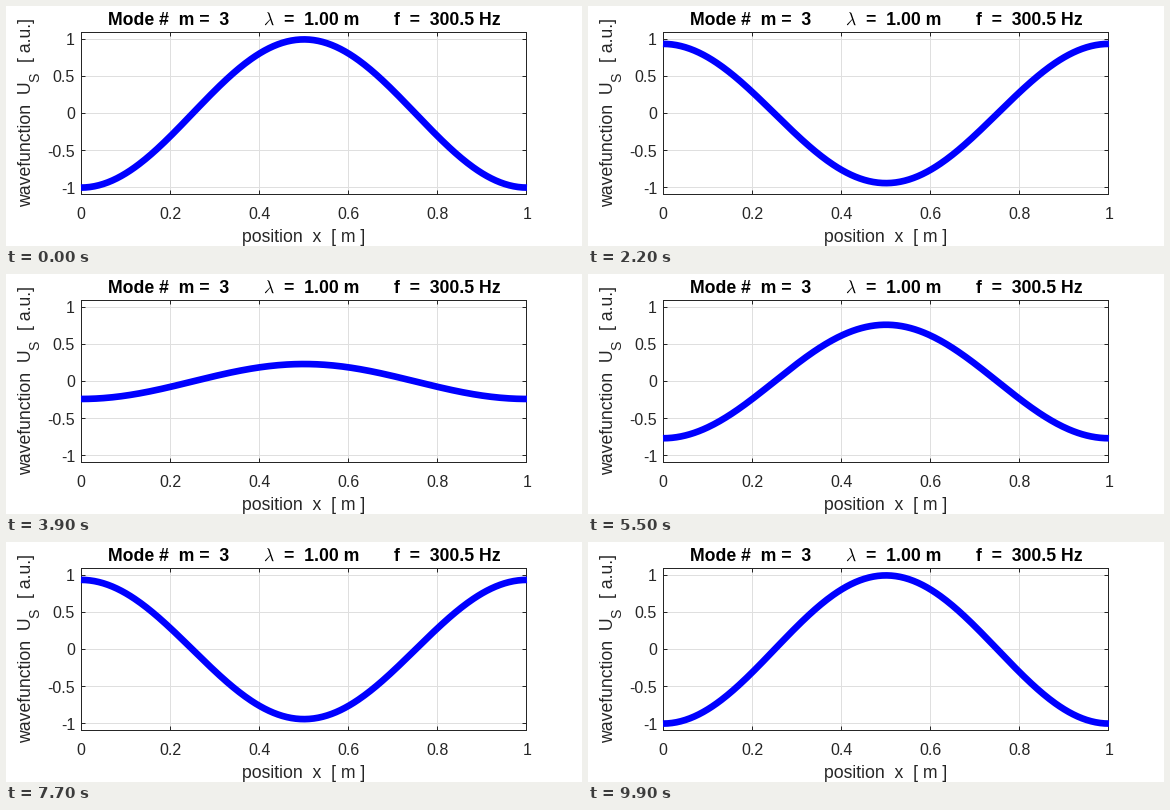
Write a matplotlib script that moves like this. It is 576x240 px and loops after 10000 ms.

```python
import math

import numpy as np
import matplotlib.pyplot as plt
from matplotlib.animation import FuncAnimation

plt.rcParams["font.family"] = "Liberation Sans"

W, H = 576, 240
LEFT, RIGHT, TOP, BOTTOM = 75, 521, 26, 189
Y_LIMIT = 1.1
FRAMES, INTERVAL = 100, 100
CYCLES = 2
INK, GRID = "#262626", "#dfdfdf"
TICK_SIZE, LABEL_SIZE = 16, 17.6
TICK_LEN = 4.5

# At 72 dpi one point is one pixel, so all sizes below are pixels.
fig = plt.figure(figsize=(W / 72, H / 72), dpi=72, facecolor="white")
ax = fig.add_axes([0, 0, 1, 1])
ax.set_xlim(0, W)
ax.set_ylim(H, 0)
ax.axis("off")


def px(x):
    return LEFT + x * (RIGHT - LEFT)


def py(y):
    return (TOP + BOTTOM) / 2 - y * (BOTTOM - TOP) / (2 * Y_LIMIT)


def center(v, end):
    """Centre of the pixel holding v, kept inside the box."""
    return min(math.floor(v), end - 1) + 0.5


def rule(x0, y0, x1, y1, color, z):
    ax.plot([x0, x1], [y0, y1], color=color, lw=1, zorder=z,
            solid_capstyle="butt", snap=False)


def label(x, y, s, size=LABEL_SIZE, color=INK, **kw):
    ax.text(x, y, s, fontsize=size, color=color, va="baseline", **kw)


def side_label(y, s, x=25, size=LABEL_SIZE):
    label(x, y, s, size, rotation=90, rotation_mode="anchor")


# Grid, ticks and tick labels
for v in np.arange(6) / 5:
    x = center(px(v), RIGHT)
    if 0 < v < 1:
        rule(x, TOP, x, BOTTOM, GRID, 1)
    rule(x, BOTTOM, x, BOTTOM - TICK_LEN, INK, 2)
    rule(x, TOP, x, TOP + TICK_LEN, INK, 2)
    label(px(v), 213, f"{v:g}", TICK_SIZE, ha="center")

for v in np.arange(-2, 3) / 2:
    y = center(py(v), BOTTOM)
    rule(LEFT, y, RIGHT, y, GRID, 1)
    rule(LEFT, y, LEFT + TICK_LEN, y, INK, 2)
    rule(RIGHT, y, RIGHT - TICK_LEN, y, INK, 2)
    label(69, py(v) + 5.98, f"{v:g}", TICK_SIZE, ha="right")

# Box
for y in (TOP + 0.5, BOTTOM - 0.5):
    rule(LEFT, y, RIGHT, y, INK, 3)
for x in (LEFT + 0.5, RIGHT - 0.5):
    rule(x, TOP, x, BOTTOM, INK, 3)

# Title and axis labels
bold = dict(color="black", weight="bold")
label(101.5, 19, "Mode #  m =  3", **bold)
label(257, 19, r"$\lambda$", color="black", math_fontfamily="cm")
label(278.5, 19, "=  1.00 m", **bold)
label(388, 19, "f  =  300.5 Hz", **bold)
label(298, 236, "position  x  [ m ]", ha="center")
side_label(201, "wavefunction  U")
side_label(76, "S", x=33, size=0.8 * LABEL_SIZE)
side_label(56, "[ a.u.]")

# Standing wave
xs = np.linspace(0, 1, 300)
shape = -np.cos(2 * np.pi * xs)
wave, = ax.plot(px(xs), py(shape), color="#0000ff", lw=6.67, zorder=4,
                solid_capstyle="butt", solid_joinstyle="round")


def update(i):
    phase = 2 * np.pi * CYCLES * i / (FRAMES - 1)
    wave.set_ydata(py(shape * np.cos(phase)))
    return wave,


anim = FuncAnimation(fig, update, frames=FRAMES, interval=INTERVAL,
                     repeat=True, repeat_delay=0)
plt.show()
```
